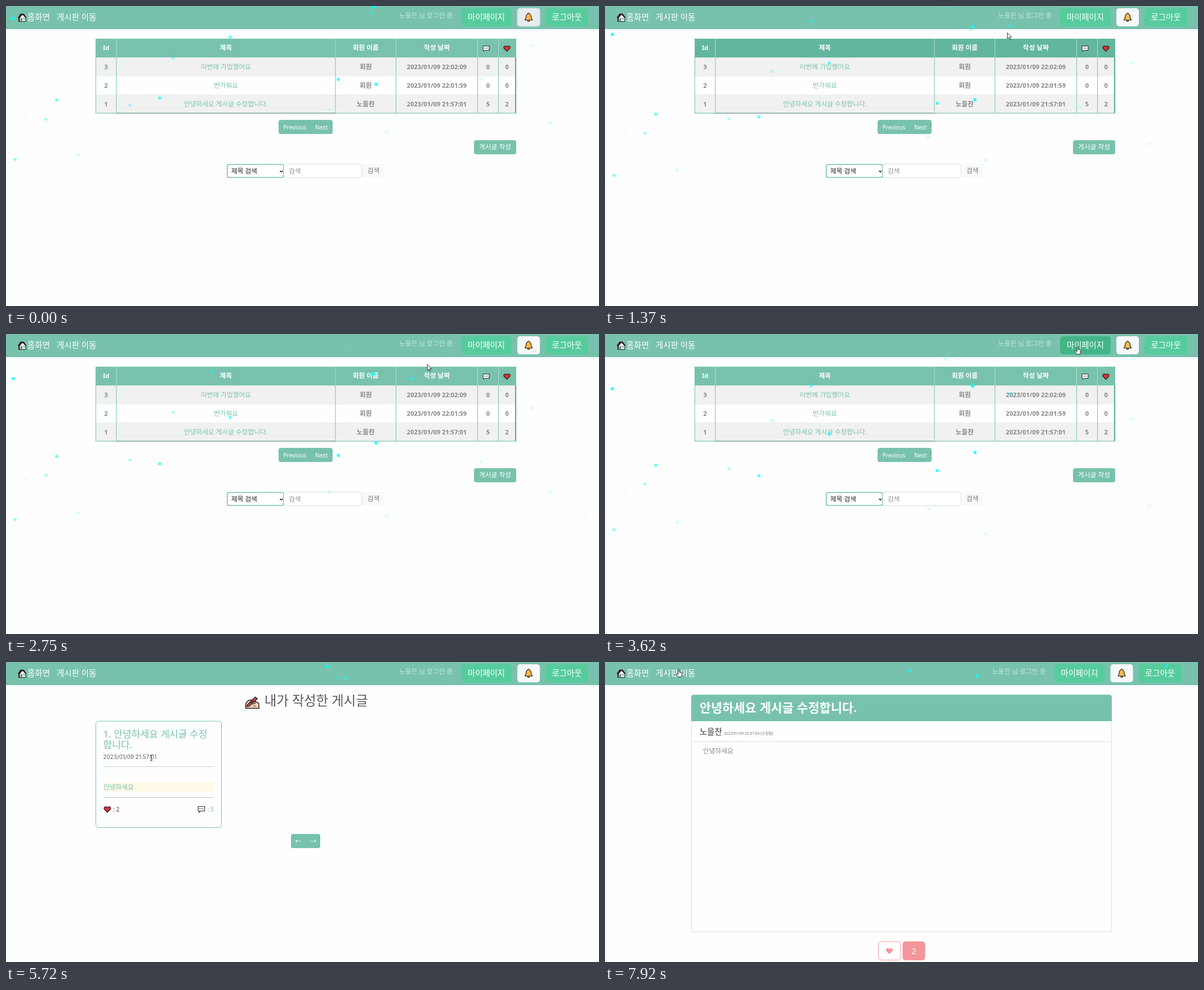
An HTML page that plays this animation: 1053 by 532 pixels, repeating every 7.99 s.

```html
<!DOCTYPE html>
<html lang="ko">
<head>
<meta charset="utf-8">
<title>게시판</title>
<style>
html, body { margin: 0; width: 100%; height: 100%; overflow: hidden; background: #fefefe; }
svg { display: block; width: 100%; height: 100%; }
text { font-family: "Noto Sans", "Noto Sans CJK KR", "Noto Sans CJK", sans-serif; white-space: pre; }
</style>
</head>
<body>
<svg id="stage" viewBox="0 0 1053 532"></svg>
<script>
const LOOP = 7990, MY_PAGE = 3950, POST_PAGE = 6050;
const TEAL = '#78c2ad', GREEN = '#56cc9d', GREY = '#888';
const PINK = 'rgb(243,150,154)', PALE = 'rgb(248,249,250)', STRIPE = 'rgb(241,241,241)';
const AUTHOR = '노을찬';
const POST = '안녕하세요 게시글 수정합니다.';

const text = (x, y, size, str, fill, anchor = 'start', weight = 400, extra = '') =>
  `<text x="${x}" y="${y}" font-size="${size}" fill="${fill}" text-anchor="${anchor}" font-weight="${weight}" ${extra}>${str}</text>`;
const box = (x, y, w, h, fill, r = 0, extra = '') =>
  `<rect x="${x}" y="${y}" width="${w}" height="${h}" rx="${r}" fill="${fill}" ${extra}/>`;
const line = (x1, y1, x2, y2, stroke, w = 1) =>
  `<path d="M${x1} ${y1}L${x2} ${y2}" stroke="${stroke}" stroke-width="${w}"/>`;
const at = (x, y, body, scale = 1) => `<g transform="translate(${x} ${y}) scale(${scale})">${body}</g>`;

// Icons are centred on 0,0
const HEART = 'M0 5L-5 0C-7-3-3-6.5 0-3.3C3-6.5 7-3 5 0Z';
const heart = `<path d="${HEART}" fill="#d2343c" stroke="#2b1515" stroke-width="1.1"/>`;
const bubble = '<path d="M-5.5-4.5H5.5V3H-1.5L-4 5.5V3H-5.5Z" fill="#fff" stroke="#222" stroke-linejoin="round"/>' +
  [-2.7, 0, 2.7].map(x => `<circle cx="${x}" cy="-.7" r=".8" fill="#222"/>`).join('');
const house = `<path d="M-6 0V7.5H6.5V0L0-6Z" fill="#eeece8" stroke="#231d1b"/>
  <path d="M-8 1L-3-6.5H3L8 0L6.5 1.5L1-4.5L-4 1V7.5H-6.5V1Z" fill="#2c2422"/>
  <path d="M-2.5 7.5V1.5H0V7.5Z" fill="#4d7e70"/><path d="M2 1H5V4H2Z" fill="#82bdb0"/>`;
const bell = `<circle cy="5.6" r="2" fill="#d77b25" stroke="#222"/>
  <path d="M0-7.5C1.2-7.5 1.5-6.5 1.5-6C4-5 4.5-3 4.5 0C4.5 2.5 6.5 3 6.5 5H-6.5C-6.5 3-4.5 2.5-4.5 0C-4.5-3-4-5-1.5-6C-1.5-6.5-1.2-7.5 0-7.5Z" fill="#fcb944" stroke="#222" stroke-width="1.2"/>`;
const writing = `<path d="M-12 10V2L-7-4L2-5L5-2L11 1L12 10Z" fill="rgb(248,217,189)" stroke="#222" stroke-width="1.5" stroke-linejoin="round"/>
  <path d="M-10 5L5-10L9-7L-5 6L-10 7Z" fill="#d9433d" stroke="#222" stroke-width="1.3" stroke-linejoin="round"/>
  <path d="M-5 1L1-2L5 0M0 3L6 1M1 6H7" fill="none" stroke="#222" stroke-width="1.2"/>`;

function navBar() {
  return box(0, 0, 1053, 41, TEAL) + at(28.5, 20, house) +
    text(38, 24.5, 14.5, '홈화면', '#fff') + text(90, 24.5, 14.5, '게시판 이동', '#fff') +
    '<g id="account">' +
    text(698, 20.5, 11.7, AUTHOR + ' 님 로그인 중', '#fff', 'start', 400, 'id="login"') +
    box(808, 4, 90, 32, GREEN, 5) + box(808, 4, 90, 32, '#43b587', 5, 'id="myHover"') +
    text(853, 24.5, 14.4, '마이페이지', '#fff', 'middle') +
    box(908, 4, 40, 32, PALE, 5) +
    box(908, 4, 40, 32, '#e9ecee', 5, 'id="bellFocus" stroke="#c3dcda" stroke-width="2"') + at(928, 20, bell) +
    box(958, 4, 76, 32, GREEN, 5) + text(996, 24.5, 14.5, '로그아웃', '#fff', 'middle') + '</g>';
}

function boardPage() {
  const cols = [159.5, 196, 585, 692.5, 837.5, 874.5, 905];
  const mid = i => (cols[i] + cols[i + 1]) / 2;
  const rows = [
    ['3', '이번에 가입했어요', '회원', '2023/01/09 22:02:09', '0', '0'],
    ['2', '반가워요', '회원', '2023/01/09 22:01:59', '0', '0'],
    ['1', POST, AUTHOR, '2023/01/09 21:57:01', '5', '2']];
  let out = box(159, 58, 747, 33.5, TEAL) + box(159, 58, 747, 33.5, '#62b69e', 0, 'id="headHover"');
  ['Id', '제목', '회원 이름', '작성 날짜'].forEach((label, i) =>
    out += text(mid(i), 78, i ? 11.7 : 11, label, '#fff', 'middle', 700));
  out += at(852.5, 75.5, bubble) + at(889.5, 75.5, heart);
  rows.forEach((row, r) => {
    const y = 91.5 + r * 33;
    out += box(159, y, 747, 33, r % 2 ? '#fefefe' : STRIPE) + line(159, y + 33, 906, y + 33, '#e3e9e7');
    row.forEach((cell, i) => out += text(mid(i), y + 20.5, i == 1 || i == 2 ? 11.7 : 11, cell,
      i == 1 ? TEAL : GREY, 'middle', i == 1 ? 400 : 700));
  });
  cols.slice(1, 6).forEach(x => out += line(x, 58, x, 91, '#b4dccc') + line(x, 91, x, 190, TEAL));
  out += line(159.5, 58, 159.5, 190, TEAL) + line(905, 91, 905, 190, '#55a78e', 2) +
    line(159, 190, 906, 190, TEAL) + line(196, 190, 585, 190, '#809b94');
  return out + box(484, 202, 96, 25, TEAL, 4) +
    text(492.5, 218.5, 10.2, 'Previous', '#fff') + text(549, 218.5, 10.2, 'Next', '#fff') +
    box(831, 238, 75, 25, TEAL, 4) + text(868.5, 253.5, 11.7, '게시글 작성', '#fff', 'middle') +
    box(393, 281, 100, 23, '#fff', 3, `stroke="${TEAL}" stroke-width="1.6"`) +
    text(400, 297, 11.7, '제목 검색', '#222') +
    '<path d="M486.5 292L489 294.5L491.5 292" fill="none" stroke="#222" stroke-width="1.5"/>' +
    box(493.5, 280, 138.5, 24.5, '#fff', 4, 'stroke="#d5dadd"') + text(502, 296.5, 11.7, '검색', '#8d9397') +
    box(633, 280, 39, 25, PALE, 4) + text(652.5, 295.5, 11.7, '검색', '#777', 'middle');
}

function myPage() {
  return at(437.5, 72, writing) + text(459, 77, 23.3, '내가 작성한 게시글', '#5a5a5a') +
    box(159.5, 105, 223, 188.5, '#fefefe', 5, `stroke="${TEAL}"`) +
    text(172.5, 134, 17.1, '1. 안녕하세요 게시글 수정', TEAL, 'start', 500) +
    text(172.5, 153, 17.1, '합니다.', TEAL, 'start', 500) +
    text(172.5, 172, 9.8, '2023/01/09 21:57:01', '#777', 'start', 500, 'style="font-family:Inter,sans-serif"') +
    line(173, 185.5, 369, 185.5, '#cacaca') + line(173, 240.5, 369, 240.5, '#cacaca') +
    box(173, 213, 196, 17, '#fff9e8') + text(173, 225.5, 11.7, '안녕하세요', TEAL) +
    at(180, 261.5, heart, 1.05) + text(190, 265.2, 10.5, ': 2', '#8b2d35') +
    at(347, 261, bubble, 1.05) + text(369, 265.2, 10.5, ': 5', TEAL, 'end') +
    box(506, 305, 52, 25, TEAL, 4) + text(519, 321.5, 11, '←', '#fff', 'middle') + text(545.5, 321.5, 11, '→', '#fff', 'middle');
}

function postPage() {
  return box(153.5, 62, 746, 416.5, '#fefefe', 0, 'stroke="#dedede"') +
    `<path d="M153 105V63Q153 58 158 58H895Q900 58 900 63V105Z" fill="${TEAL}"/>` +
    text(168, 89, 21.9, POST, '#fff', 'start', 700) +
    text(168, 128.5, 14.5, AUTHOR, '#777', 'start', 700) +
    text(211, 128.5, 6.65, '2023/01/09 22:01:04 (수정됨)', '#777') +
    line(153, 141.5, 900, 141.5, '#dedede') + text(174, 162, 11.7, '안녕하세요', GREY) +
    box(485.5, 496, 39.5, 32.5, '#fff', 5, `stroke="${PINK}"`) + at(505, 512.5, `<path d="${HEART}" fill="${PINK}"/>`, 1.1) +
    box(528.5, 495.5, 40, 33.5, PINK, 5) + text(548.5, 517.5, 15, '2', '#fff', 'middle');
}

const cursors = {
  arrow: '<path d="M0 0V10.5L2.5 8.3L4.2 12L5.8 11.3L4.2 7.7H7.3Z" fill="#fff" stroke="#222" stroke-width=".9"/>',
  hand: '<path d="M-1 0Q0-1.5 1 0V4.5L5 5.5Q6 6 5.5 8L4.5 13H-1.5L-4.5 8Q-4 6.5-2.5 7.5L-1 8.5Z" fill="#fff" stroke="#222" stroke-width=".9"/>',
  beam: '<path d="M-2-5H-.5L0-4.5L.5-5H2M0-4.5V4.5M-2 5H-.5L0 4.5L.5 5H2" fill="none" stroke="#222"/>'
};

// Falling dots: x, y at the base time, px per second, opacity
const dotSets = [
  { begin: 0, end: MY_PAGE, base: 0, list: [
    [13, 22, 20.7, .85], [653, 2, 25, .9], [649, 12, 21.5, .35], [720, -7, 31.2, .6], [366, -13, 29, .55],
    [398, 55, 33.8, .6], [297, 93, 16.7, .28], [273, 163, 24.4, .65], [220, 176, 17.4, .33], [590, 130, 31, .75],
    [657, 139, 19.6, .85], [843, 130, 35, .17], [574, 184, 35, .17], [676, 224, 36, .15], [90, 167, 18.2, .6],
    [71, 201, 17.9, .38], [35, 193, 23.6, .09], [128, 264, 19.3, .18], [16, 272, 20.7, .45], [935, 70, 22.2, .17],
    [966, 207, 27, .15], [1028, 244, 28, .06], [604, -28, 20, .2], [938, -14, 16, .14]] },
  { begin: MY_PAGE, end: POST_PAGE, base: 5720, list: [[604, 28, 19.5, .6], [571, 8, 20, .95], [588, 29, 25, .35]] },
  { begin: POST_PAGE, end: LOOP, base: 7920, list: [[542, 16, 20, .8], [661, 25, 22, .8], [997, 7, 20, .8]] }
];

// Pointer path: time, x, y
const path = [
  [790, 1025, 513], [860, 974, 474], [930, 932, 420], [1370, 714.5, 47.5], [1950, 711, 25], [2300, 720, 40],
  [2750, 748, 54], [3300, 835, 22], [4080, 845, 24], [4200, 728, 78], [4340, 580.5, 154], [4600, 330, 200],
  [4900, 135, 205], [4990, 172, 214], [5300, 215, 252], [5500, 304, 207], [5690, 258, 170], [5740, 258, 170],
  [5900, 240, 130], [6530, 238, 132], [6900, 200, 175], [7150, 142, 170], [7330, 212, 130], [7700, 150, 40],
  [7850, 131, 13.5], [LOOP, 131, 13.5]];

const el = id => document.getElementById(id);
el('stage').innerHTML = [boardPage, myPage, postPage].map(p => `<g class="page">${p()}</g>`).join('') + navBar() +
  dotSets.map(set => '<g class="dots">' + set.list.map(d =>
    `<circle cx="${d[0]}" r="2.8" fill="#0ff" opacity="${d[3]}"/>`).join('') + '</g>').join('') +
  '<g id="pointer">' + Object.keys(cursors).map(k => `<g id="${k}">${cursors[k]}</g>`).join('') + '</g>';

const pages = [...document.querySelectorAll('.page')];
const dotGroups = [...document.querySelectorAll('.dots')];
const show = (node, on) => { node.style.display = on ? '' : 'none'; };
const ramp = (t, a, b) => Math.max(0, Math.min(1, (t - a) / (b - a)));
const pulse = (t, a, b, c, d) => ramp(t, a, b) * (1 - ramp(t, c, d));

function pointerAt(t) {
  const i = Math.max(1, path.findIndex(p => p[0] > t));
  const [a, b] = [path[i - 1], path[i]];
  const k = ramp(t, a[0], b[0]);
  return [a[1] + (b[1] - a[1]) * k, a[2] + (b[2] - a[2]) * k];
}

function pointerKind(t) {
  if (t > 5640 && t < 5790) return 'beam';
  const hand = (t > 3180 && t < 4090) || (t >= 5790 && t < POST_PAGE) || t > 7800;
  return hand ? 'hand' : 'arrow';
}

function draw(t) {
  dotSets.forEach((set, i) => {
    const on = t >= set.begin && t < set.end;
    show(pages[i], on);
    show(dotGroups[i], on);
    if (on) set.list.forEach((d, j) =>
      dotGroups[i].children[j].setAttribute('cy', d[1] + d[2] * (t - set.base) / 1000));
  });
  el('account').setAttribute('transform', `translate(${t >= POST_PAGE ? -10.5 : 0} 0)`);
  el('bellFocus').setAttribute('opacity', 1 - ramp(t, 70, 250));
  el('headHover').setAttribute('opacity', pulse(t, 1290, 1360, 1380, 1530));
  el('login').setAttribute('opacity', .6 + .4 * pulse(t, 1650, 1800, 2050, 2200));
  el('myHover').setAttribute('opacity', pulse(t, 3180, 3320, 4200, 4400));
  show(el('pointer'), t >= path[0][0]);
  el('pointer').setAttribute('transform', `translate(${pointerAt(t).join(' ')})`);
  const kind = pointerKind(t);
  Object.keys(cursors).forEach(k => show(el(k), k === kind));
}

const start = performance.now();
function tick() {
  draw((performance.now() - start) % LOOP);
  requestAnimationFrame(tick);
}
tick();
</script>
</body>
</html>
```
